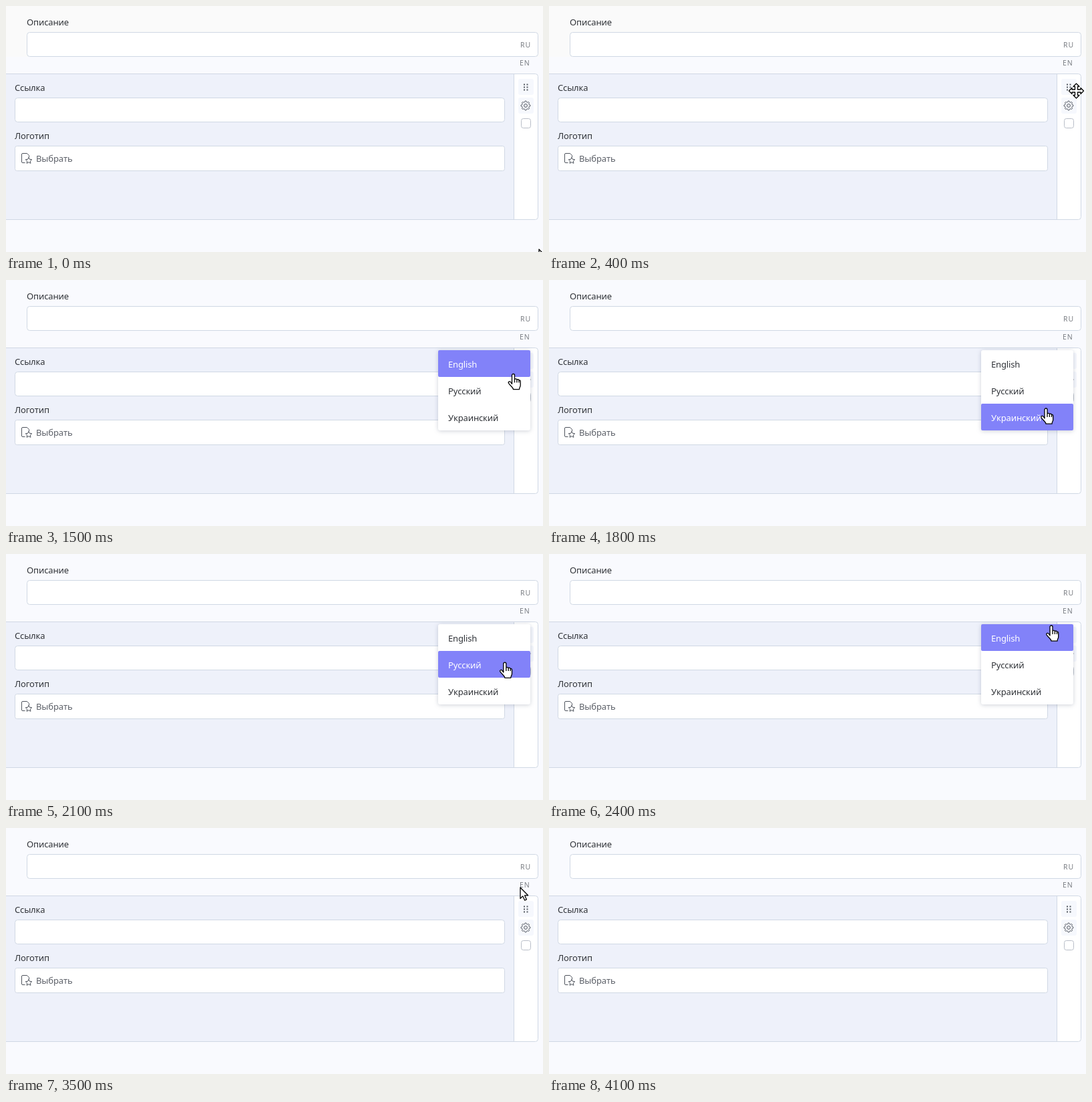
An HTML page for the animation above (4.6 s loop, 804x368 px).

```html
<!DOCTYPE html>
<html lang="ru">
<meta charset="utf-8">
<title>Language menu</title>
<style>
  html, body { margin: 0; width: 100%; height: 100%; overflow: hidden; background: #f9fafe; }
  svg { display: block; }
  text { font: 13px "Noto Sans", "Open Sans", sans-serif; letter-spacing: -.15px; fill: #303338; }
  .lang { font-size: 10.5px; letter-spacing: .9px; fill: #7d8086; }
  .soft { fill: #5c6068; }
  .box { fill: #fff; stroke: #d0d8e4; }
  .icon { fill: none; stroke: #50555e; stroke-linejoin: round; }
  .cursor { fill: #fff; stroke: #000; stroke-width: 1.3; stroke-linejoin: round; }
  #menu { filter: drop-shadow(0 1px 3px rgba(60, 70, 100, .25)); transform-origin: 716px 105px; }
</style>
<svg width="804" height="368" viewBox="0 0 804 368">
  <rect id="top" width="804" height="76" fill="#fafafa"/>
  <text x="31" y="29">Описание</text>
  <rect class="box" x="31.5" y="39.5" width="765" height="36" rx="4"/>
  <text class="lang" x="770" y="62">RU</text>
  <text class="lang" x="769" y="89">EN</text>

  <rect class="box" x="-9.5" y="101.5" width="806" height="218" rx="4"/>
  <path d="M0 102H760V319H0z" fill="#eef1fa"/>
  <path d="M760.5 102V319" stroke="#d0d8e4"/>
  <text x="13" y="127">Ссылка</text>
  <rect class="box" x="13.5" y="137.5" width="733" height="36" rx="4"/>
  <text x="13" y="199">Логотип</text>
  <rect class="box" x="13.5" y="209.5" width="733" height="37" rx="3"/>
  <text class="soft" x="45" y="233">Выбрать</text>
  <path class="icon" d="M28.5 234.5H25a1.5 1.5 0 0 1-1.5-1.5V222a1.5 1.5 0 0 1 1.5-1.5h6.5l3 3v2.5"/>
  <path id="star" class="icon" fill="#fff"/>

  <g fill="#f6f8fd">
    <rect x="767" y="109" width="23" height="24" rx="3"/>
    <rect x="767" y="137" width="23" height="24" rx="3"/>
  </g>
  <path d="M776 116.5v10M780.5 116.5v10" stroke="#555a63" stroke-width="2" stroke-dasharray="2"/>
  <path id="gear" class="icon"/>
  <circle class="icon" cx="778" cy="149" r="2.4"/>
  <rect x="771.5" y="168.5" width="14" height="14" rx="3" fill="#fff" stroke="#b9bec8"/>

  <g id="menu">
    <rect x="647" y="105" width="138" height="120" rx="3" fill="#fff"/>
    <rect id="hover" x="647" width="138" height="40" rx="2" fill="#8282f9"/>
    <text x="662" y="131">English</text>
    <text x="662" y="171">Русский</text>
    <text x="662" y="211">Украинский</text>
  </g>

  <g id="pointer" class="cursor">
    <path id="arrow" d="M0 0V16.5l3.8-3.6 2.9 6.3 2.7-1.2-2.9-6.2H11.6z"/>
    <path id="hand" d="M-2 15V2a2 2 0 0 1 4 0v6c1-1 3-.6 3.4.6c1-.8 2.7-.4 3.1.8c1.2-.4 2.2.4 2.2 1.8v6c0 2-1.7 3-1.7 6H0c0-3-4-5-7-9.4c-1-2 1.4-3.2 3-1.8zM2 8v5M5.4 8.6V13M8.5 9.4V13"/>
    <path id="move"/>
  </g>
</svg>
<script>
  const $ = id => document.getElementById(id);
  const LOOP = 4600, STEP = 100;

  const polar = (cx, cy, count, radius, start) => 'M' + Array.from({ length: count }, (_, i) => {
    const a = start + i * 2 * Math.PI / count, r = radius(i);
    return `${(cx + r * Math.cos(a)).toFixed(2)} ${(cy + r * Math.sin(a)).toFixed(2)}`;
  }).join('L') + 'z';

  $('star').setAttribute('d', polar(34, 231.3, 10, i => i % 2 ? 2.4 : 5, -Math.PI / 2));
  $('gear').setAttribute('d', polar(778, 149, 32, i => i % 4 < 2 ? 7 : 5.4, -Math.PI / 2 - .1));

  // Four-way arrow: one quarter outline turned around the centre.
  const quarter = [[-2, -2], [-2, -6.5], [-4.5, -6.5], [0, -11], [4.5, -6.5], [2, -6.5]];
  let points = [];
  for (let turn = 0, side = quarter; turn < 4; turn++) {
    points = points.concat(side);
    side = side.map(([x, y]) => [-y, x]);
  }
  $('move').setAttribute('d', 'M' + points.join('L') + 'z');

  // Pointer stops: time, x, y
  const stops = [
    [0, 798, 364], [200, 786, 326], [300, 790, 200], [400, 789.5, 127], [500, 779, 97],
    [600, 775, 89], [1200, 775, 89], [1800, 744, 192], [1900, 744, 192], [2400, 752, 107],
    [2500, 752, 107], [2900, 770, 89], [3700, 770, 89], [4000, 597, 329]
  ];
  const clamp = v => Math.max(0, Math.min(1, v));
  const ease = v => v * v * (3 - 2 * v);

  function pointerAt(t) {
    const next = stops.findIndex(s => s[0] > t);
    if (next < 0) return stops[stops.length - 1].slice(1);
    const [t0, x0, y0] = stops[next - 1], [t1, x1, y1] = stops[next];
    const k = t > 600 ? ease((t - t0) / (t1 - t0)) : (t - t0) / (t1 - t0);
    return [x0 + (x1 - x0) * k, y0 + (y1 - y0) * k];
  }

  const show = (id, on) => $(id).style.display = on ? '' : 'none';

  function draw(now) {
    const t = Math.floor(now % LOOP / STEP) * STEP;
    const [x, y] = pointerAt(t);
    const open = ease(clamp((t - 800) / 300) * clamp((3500 - t) / 300));
    const item = open === 1 && x > 647 && x < 785 && y >= 105 && y < 225 ? Math.floor((y - 105) / 40) : -1;
    const dragging = open === 0 && x > 767 && x < 791 && y > 109 && y < 133;

    show('top', t < 700);
    show('menu', open > 0);
    $('menu').style.opacity = open;
    $('menu').style.transform = `scaleY(${open})`;
    show('hover', item >= 0);
    $('hover').setAttribute('y', 105 + item * 40);
    document.querySelectorAll('#menu text').forEach((label, i) => label.style.fill = i === item ? '#fff' : '');

    show('pointer', t < 4100);
    $('pointer').setAttribute('transform', `translate(${x} ${y})`);
    show('move', dragging);
    show('hand', item >= 0);
    show('arrow', !dragging && item < 0);
    requestAnimationFrame(tick);
  }

  let start;
  function tick(now) {
    start ??= now;
    draw(now - start);
  }
  requestAnimationFrame(tick);
</script>
</html>
```
